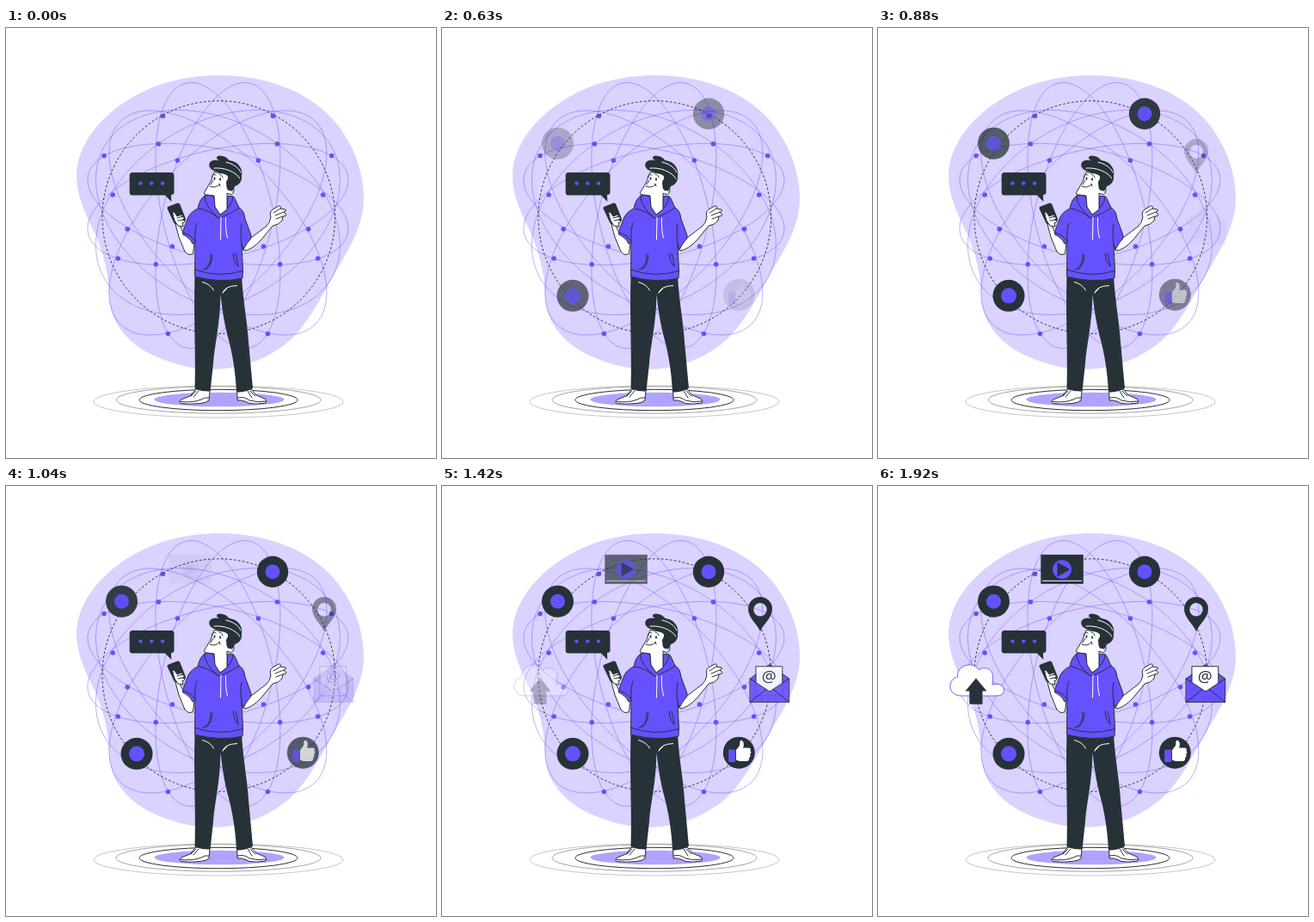
An HTML page that plays this animation: 500 px wide and 500 px high, repeating every 2000 ms.

```html
<!DOCTYPE html>
<html lang="en">
<head>
<meta charset="utf-8">
<title>Connected world</title>
<style>
  html, body { margin: 0; width: 100%; height: 100%; overflow: hidden; background: #fff; }
  svg { display: block; width: 100%; height: 100%; }
  .dark { fill: #263238; }
  .main { fill: #6651ff; }
  .white { fill: #fff; }
  .line { fill: none; stroke: #263238; stroke-width: 1; stroke-linecap: round; stroke-linejoin: round; }
  .edge { stroke: #263238; stroke-width: 1; stroke-linejoin: round; stroke-linecap: round; }
  .light { fill: none; stroke: #fff; stroke-width: 1; stroke-linecap: round; }
  .orbit { fill: none; stroke: #6651ff; stroke-width: .6; opacity: .75; }
  .icon > * { opacity: 0; }
  text { font: 19px "Open Sans", "Noto Sans", sans-serif; text-anchor: middle; }
</style>
</head>
<body>
<svg viewBox="0 0 500 500">
  <path fill="#dad2ff" d="M248 55C302 55 350 74 378 104C404 132 416 168 416 198C416 234 394 264 376 296C350 344 335 366 300 383C265 400 225 401 190 388C152 376 121 350 120 312C119 285 114 262 103 238C92 215 82 195 82 172C82 140 105 107 140 85C172 64 210 55 248 55Z"/>
  <g id="globe"></g>
  <circle class="line" cx="247.3" cy="220" r="135.3" stroke-dasharray="2.6 2.4" style="stroke-linecap:butt"/>

  <!-- floor rings -->
  <g fill="none">
    <ellipse cx="247" cy="434.5" rx="145" ry="18.5" stroke="#c7c7c7"/>
    <ellipse cx="247" cy="432.5" rx="119" ry="15.7" stroke="#8b8f92" stroke-width=".8"/>
    <ellipse cx="247" cy="432.5" rx="92" ry="12.2" stroke="#263238"/>
    <ellipse cx="248" cy="432" rx="75.5" ry="8.3" fill="#b0a2ff"/>
  </g>

  <!-- speech bubble -->
  <path class="dark" d="M147 168H192Q195.500 168 195.500 171.500V191Q195.500 194 192 194L192.300 202L185 194.500H147Q143.700 194.500 143.700 191V171.500Q143.700 168 147 168Z"/>
  <g class="main">
    <circle cx="156.500" cy="180.600" r="2.200"/><circle cx="169.200" cy="180.600" r="2.200"/><circle cx="182" cy="180.600" r="2.200"/>
  </g>

  <!-- shoes and trousers -->
  <g class="white edge">
    <path d="M221 420L237 421L236 433Q233 436 226 436.500Q213 438 203 436.500Q200 434 205 431.500L214 428Z"/>
    <path d="M269 423L285 420L291 427L301 431Q304 434 302 436Q292 438 283 436.500Q275 432 269.500 433Z"/>
  </g>
  <path class="line" d="M203 434.500Q218 436 227 432Q231 429 236 430M215 428L221 422M218 429L224 422M269.500 430Q277 428 283 433Q293 436 302 434M286 430L281 422M290 428L284 422"/>
  <path class="dark" d="M219.500 288L274 289C276 320 281 345 282 365L287 419Q277 424 268 423.500C267 400 263 378 259 363C254 345 251 325 249.500 310C249 345 242 371 241 390L237.500 422.500Q228 423 219.500 419.500C221 380 218 340 219.500 288Z"/>
  <path class="light" d="M228.500 295.500Q238 298 241.500 305M252 308Q254 300 268.500 299.500M252 308L257 303"/>

  <!-- bare arms -->
  <g class="white edge">
    <path d="M207 240L201 228L196 222L198 232L201 243L208 260Q213 266 217.500 262L219 249L209 236Z"/>
    <path d="M275 248L285 244L302 231Q307 227 308 220Q306 214 310 211L317 207Q321 207 319 210L325 211Q327 213 323 214L326 217Q326 219 322 219L321 224Q317 229 310 230L297 246Q286 258 277 259Q273 257 275 248Z"/>
  </g>
  <path class="line" d="M319 210L311 215M323 214L313 218M322 219L314 222"/>

  <!-- phone and fingers -->
  <path class="dark" d="M189 207.500L199.500 203.500Q201.500 203 202.300 205L209 222Q209 225 206 226L198 228.500Q196 228 195 226L187.500 210Q187 208 189 207.500Z"/>
  <path class="white edge" stroke-width=".8" d="M194 217Q193 213 196 214.500L199 219L204 217Q207 217.500 204 219.500L207 220Q208.500 222 205 223L208 224Q208 226.500 205 226.500L206 231L200 230Q195 224 194 217Z"/>
  <path class="line" stroke-width=".8" d="M199 221L204 219.500M200 224L205 223"/>

  <!-- hoodie -->
  <path class="main edge" d="M231 195Q237 193 242 196L243 208L249 217L257 211L257 196Q264 194 266 198L271 209Q277 212 278 222L285 241Q286 245 282 248Q279 252 276 258L274 251L275.500 282L275 291Q249 297 219.500 289L220 249L217 251Q214 244 205.500 240Q205 237 210 225Q213 214 223 210Q225 199 231 195Z"/>
  <path class="line" d="M224 210Q235 211 247 221Q262 216 271 209M231 196Q230 206 247 221M264 196Q264 207 249 217M220 249Q219 235 222 227M274 251Q272 238 274 228M206 238Q215 240 220 248M219.500 281Q247 291 275.500 282.500M240 264Q239 274 235 279L229 281M238 263Q239 275 232 279M264 262Q265 273 270 277M267 262Q269 268 270 277"/>
  <path class="light" d="M250 220L249.500 246M255.500 221Q255 235 257.500 244"/>

  <!-- head -->
  <path class="white edge" d="M242 168Q239 179 231 190.500Q229 194 234 194L242 195L243 208L249 217L257 211V192Q264 196 265 189Q265 185 260 185L258 170Z"/>
  <path class="dark" d="M236.500 161C235 155 241 152 248 154C242 151 246 147 252 149C257 150 258 153 260 154C270 155 276 164 274 172C275 179 270 183 266 184Q265 189 262 189Q257 190 256.500 185L256 179L259 173C251 166 240 169 236.500 161Z"/>
  <path class="light" d="M242 163C254 162 267 167 272 175M256 156C265 158 271 163 273 168"/>
  <path class="line" d="M237 184Q243 187 248 182M248 181L249 184M239 173Q241 169 244 171M248 170Q251 170 252 174M241 177L238 182M261 187L263 190"/>
  <g class="dark"><ellipse cx="242.500" cy="175" rx="1" ry="1.800"/><ellipse cx="249" cy="176" rx="1" ry="1.800"/></g>

  <!-- icons: data-in holds fade start and end in ms -->
  <g class="icon" data-in="250 850">
    <circle class="dark" cx="152" cy="311.300" r="18.500"/><circle class="main" cx="152" cy="311.300" r="9"/>
  </g>
  <g class="icon" data-in="330 970">
    <circle class="dark" cx="310" cy="99.700" r="18.200"/><circle class="main" cx="310" cy="99.700" r="8.500"/>
  </g>
  <g class="icon" data-in="355 1135">
    <circle class="dark" cx="134.500" cy="134.200" r="18.500"/><circle class="main" cx="134.500" cy="134.200" r="8.500"/>
  </g>
  <g class="icon" data-in="430 1290">
    <circle class="dark" cx="345.300" cy="310.200" r="18.500"/>
    <rect class="main" x="333.200" y="306.500" width="8" height="14.500" rx="1"/>
    <path class="white" d="M342 307L346 302L346.500 297Q347 295 349.500 296.500Q352 299 350 304.500H357Q360 305.500 358.500 308Q360.500 310 358 312Q359.500 314.500 357 316Q358 319 354.500 320H346L342 318.500Z"/>
  </g>
  <g class="icon" data-in="590 1430">
    <path class="dark" fill-rule="evenodd" d="M370 169C366 160 356 153 356 143A14 14 0 0 1 384 143C384 153 374 160 370 169ZM370 136A7.700 7.700 0 0 0 370 151.400A7.700 7.700 0 0 0 370 136Z"/>
  </g>
  <g class="icon" data-in="770 1560">
    <path class="main edge" d="M358.300 224L381 207.500L403.700 224L381 239Z"/>
    <rect class="white edge" x="365.300" y="209.800" width="30.500" height="34"/>
    <text class="dark" x="380.300" y="227.500">@</text>
    <path class="main edge" d="M358.300 224L381 239L403.700 224V251.300H358.300Z"/>
    <path class="line" d="M358.300 251.300L377 236.500M403.700 251.300L385 236.500"/>
  </g>
  <g class="icon" data-in="880 1740">
    <rect class="dark" x="189.300" y="79.800" width="49.500" height="34"/>
    <path class="light" d="M191.500 110.300H236.500"/>
    <circle class="main" cx="214" cy="97" r="11"/><path class="dark" d="M208.500 88.800V105.200L223.200 97Z"/>
  </g>
  <g class="icon" data-in="1120 1920">
    <path class="white" stroke="#6651ff" stroke-width=".9" d="M97 244C81 244 80 225 92.500 222C91 208 111 203 117.500 214C124 208 134 214 133.500 222L133 231C142 228 147 234 146.500 238C146 243 141 244 137 244Z"/>
    <path class="dark" d="M114 223.500L126.500 238.500H121.500V253.800H106.300V238.500H101.500Z"/>
  </g>
</svg>
<script>
  const MID = 246.4, LOOP = 2000, STEPS = 48;
  const globe = document.getElementById("globe");

  function add(tag, attrs) {
    const el = document.createElementNS("http://www.w3.org/2000/svg", tag);
    for (const key in attrs) el.setAttribute(key, attrs[key]);
    globe.append(el);
  }

  // Tilted ellipse from its half extents; lean is the correlation of x and y.
  function orbit(cy, halfW, halfH, lean) {
    const shift = Math.acos(lean), points = [];
    for (let i = 0; i < 90; i++) {
      const a = i * Math.PI / 45;
      points.push((MID + halfW * Math.cos(a)).toFixed(2) + "," + (cy + halfH * Math.cos(a - shift)).toFixed(2));
    }
    add("polygon", { points: points.join(" "), class: "orbit" });
  }

  const orbits = [[218, 72.5, 154.5, .43], [226.5, 126.5, 130.5, .62], [205, 151.5, 70.7, .4], [214.5, 142, 119, .32]];
  for (const [cy, w, h, lean] of orbits) {
    orbit(cy, w, h, lean);
    orbit(cy, w, h, -lean);
  }

  // Half gap and height of each mirrored pair of nodes.
  const nodes = [[64, 102.3], [69, 134.7], [132.3, 148.5], [47, 154], [122.2, 194], [105.2, 233.7],
    [53, 254], [116.2, 268], [72.2, 274.7], [58, 355.5]];
  for (const [gap, cy] of nodes)
    for (const side of [-1, 1]) add("circle", { cx: MID + side * gap, cy, r: 2.8, class: "main" });

  // Every part of an icon fades on its own, so lower layers show through.
  for (const part of document.querySelectorAll(".icon > *")) {
    const [start, end] = part.parentNode.dataset.in.split(" ").map(Number);
    part.animate([
      { opacity: 0, offset: 0 },
      { opacity: 0, offset: start / LOOP, easing: "cubic-bezier(.37, 0, .63, 1)" },
      { opacity: 1, offset: end / LOOP },
      { opacity: 1, offset: 1 }
    ], { duration: LOOP, iterations: Infinity, easing: `steps(${STEPS})` });
  }
</script>
</body>
</html>
```
